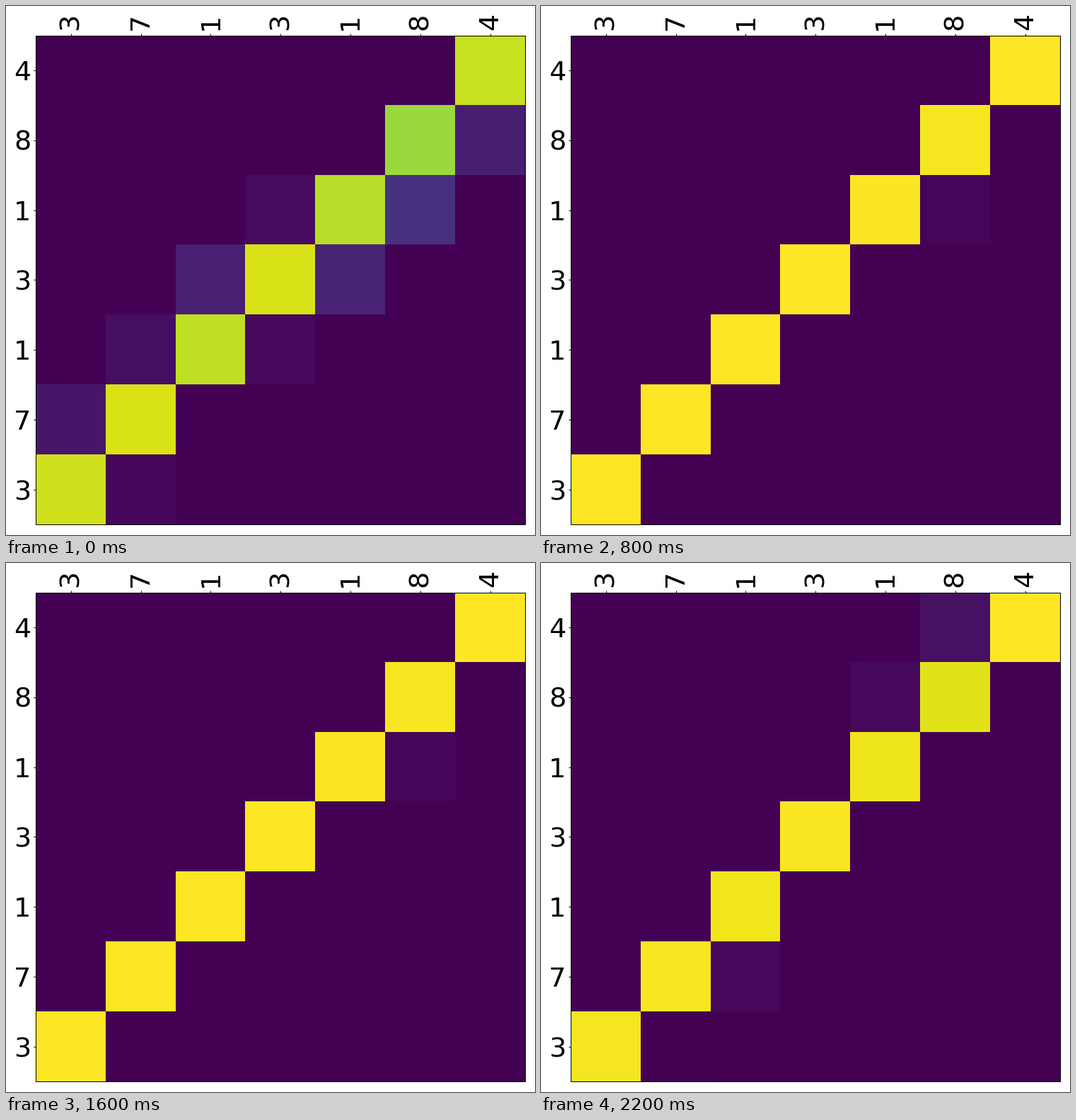
Animation of 748 by 748 pixels, one loop 2400 ms. Source, as a matplotlib script:

```python
import numpy as np
import matplotlib.pyplot as plt
from matplotlib.animation import FuncAnimation

SIZE, DPI = 748, 88
PX = 72 / DPI  # points per pixel
FRAMES, STEP = 12, 200
ROWS = "4813173"
TOP, BOTTOM = 41.5, 733.45
RESTART = 9  # training starts over here, with a shorter and blurred output

# How far each output symbol looks past its own row once training settles
LEAN = np.array([-0.12, -0.05, -0.17, -0.02, 0.19, 0.25, 0.16])


def attend(centres, sharpness):
    """Each column is a normalised bell over the rows and the padding below."""
    rows = np.arange(len(ROWS) + 3)[:, None]
    weights = np.exp(-0.5 * sharpness * (rows - centres) ** 2)
    return (weights / weights.sum(axis=0))[:len(ROWS)]


def attention(age):
    if age == 0:
        centres = np.array([5.9, 4.72, 3.85, 2.87, 1.96, 0.19])
        sharpness = np.interp(range(6), [0, 1, 4, 5], [0.65, 3.4, 3.1, 1.87])
    else:
        swing = np.interp(age, [1, 2, 3], [0, -0.9, 1])
        centres = np.arange(len(ROWS))[::-1] + swing * LEAN
        sharpness = np.interp(age, [1, 2, 3, 4, 7], [9, 11, 7.1, 9.6, 17])
    return attend(centres, sharpness)


fig = plt.figure(figsize=(SIZE / DPI, SIZE / DPI), dpi=DPI, facecolor="white")


def heatmap(cols, x0, x1):
    ax = fig.add_axes([x0 / SIZE, 1 - BOTTOM / SIZE,
                       (x1 - x0) / SIZE, (BOTTOM - TOP) / SIZE])
    img = ax.imshow(np.zeros((len(ROWS), len(cols))), cmap="viridis",
                    vmin=0, vmax=1, aspect="auto", interpolation="nearest")
    ax.set_xticks(range(len(cols)), list(cols), rotation=90)
    ax.set_yticks(range(len(ROWS)), list(ROWS))
    ax.tick_params(length=3.5 * PX, width=PX, pad=3.5 * PX,
                   labelsize=38 * PX, labelfontfamily="DejaVu Sans",
                   top=True, labeltop=True, bottom=False, labelbottom=False)
    for spine in ax.spines.values():
        spine.set_linewidth(PX)
    return ax, img


full = heatmap("3713184", 42.3, 734.25)
short = heatmap("311114", 77.2, 670.3)


def update(i):
    age = (i - RESTART) % FRAMES
    for ax, _ in (full, short):
        ax.set_visible(False)
    ax, img = full if age else short
    img.set_data(attention(age))
    ax.set_visible(True)
    return [img]


anim = FuncAnimation(fig, update, frames=FRAMES, interval=STEP,
                     repeat=True, repeat_delay=0, blit=False)
plt.show()
```
